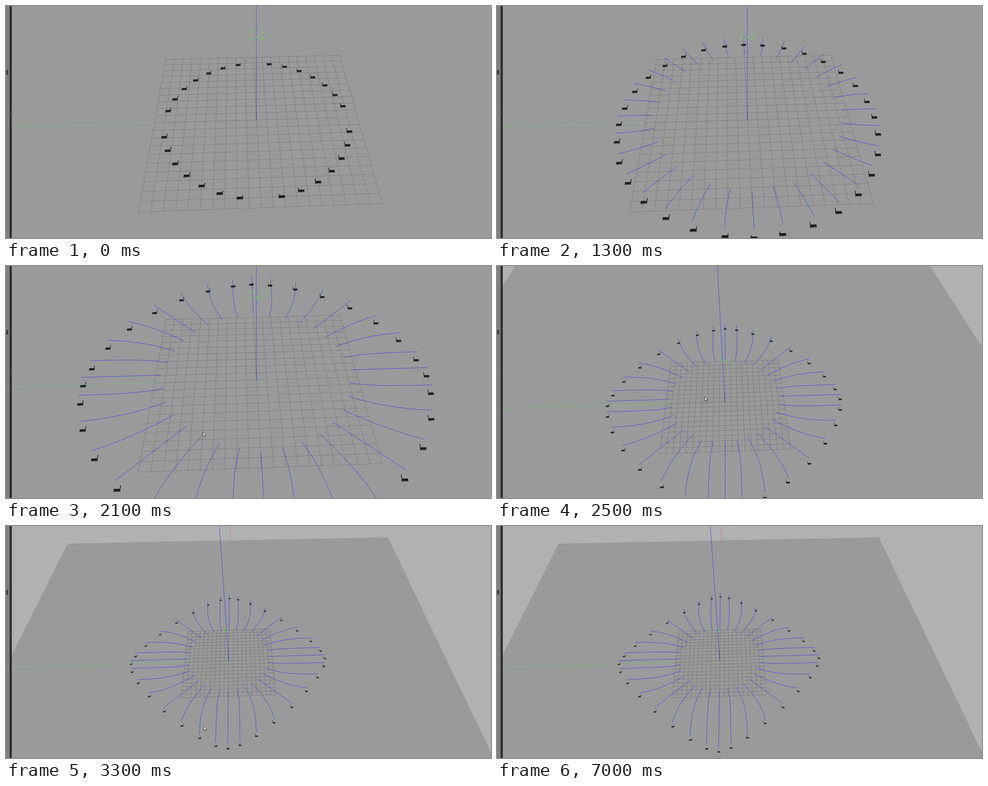
An HTML page with a canvas that plays this animation: 1081 px wide and 518 px high, repeating every 8000 ms.

```html
<!DOCTYPE html>
<html lang="en">
<head>
<meta charset="utf-8">
<title>Robot swarm spreading out</title>
<style>
html, body { margin: 0; width: 100%; height: 100%; overflow: hidden; background: #9a9a9a; }
canvas { display: block; }
</style>
</head>
<body>
<canvas id="stage" width="1081" height="518"></canvas>
<script>
const ctx = document.getElementById('stage').getContext('2d');
const LOOP = 8000, STEP = 100, ROBOTS = 32;
const RADIUS = 9, REACH = 13.2, BULGE = 9.6;   // start circle and final outline, in grid cells
const NADIR_Y = 1700, TRAIL_HEIGHT = 0.88, ROBOT_SHIFT = 0.18;

// Views: grid corners clockwise from top left, blue axis, marker box
const WIDE = [356, 119.5, 744, 110, 839, 441, 295, 460, 558, 254, 558, 0, 544.5, 57.5, 28, 16];
const MID = [388, 216, 628, 210, 654, 409, 362, 419, 508, 304, 491, 0, 496.5, 204, 14, 9];
const FAR = [406, 235, 588, 230, 601, 377, 390, 384, 496.5, 301, 475.5, 0, 485.5, 229, 10, 6.5];

// Tracks: a time followed by the values reached then
const VIEW = [[2300, ...WIDE], [2500, ...MID], [2600, ...FAR]];
const SPREAD = [[800, 0], [1300, 0.257], [2100, 0.569], [2500, 0.772], [2800, 0.88], [3300, 0.95], [3900, 1]];
const POINTER = [[2000, 434, 392], [2100, 439, 371], [2400, 463, 292], [2600, 463, 292],
  [3300, 441, 447], [3700, 425, 506], [3900, 423, 496], [4400, 423, 496], [4600, 364, 510]];
const POINTER_LATER = [[6800, 138, 362], [6900, 0, 504]];

const mix = (a, b, p) => a + (b - a) * p;

function follow(track, t) {
  const next = track.findIndex(key => key[0] > t);
  if (next === 0) return track[0].slice(1);
  if (next < 0) return track[track.length - 1].slice(1);
  const [t0, ...from] = track[next - 1], [t1, ...to] = track[next];
  return from.map((value, i) => mix(value, to[i], (t - t0) / (t1 - t0)));
}

// Ground position of a robot; the eight-fold symmetry leaves five kinds, from axis (0) to diagonal (1)
function robotAt(index, spread) {
  const j = index % 8, kind = (j > 4 ? 8 - j : j) / 4, angle = kind * Math.PI / 4;
  const settle = power => 1 - (1 - spread) ** power;
  const side = mix(RADIUS * Math.sin(angle), REACH * kind ** 1.25, settle(1.6 / kind));
  const ahead = mix(RADIUS * Math.cos(angle), REACH + BULGE * Math.cos(2 * angle), settle(1 + 0.6 * kind ** 2));
  let [x, y] = j > 4 ? [ahead, -side] : [side, -ahead];
  for (let q = Math.floor(index / 8); q > 0; q--) [x, y] = [-y, x];
  return [x, y];
}

// Perspective of the ground plane; the grid spans -10..10 both ways
function makeCamera([x0, y0, x1, y1, x2, y2, x3, y3, ax, ay, topX, topY]) {
  const dx1 = x1 - x2, dx2 = x3 - x2, sx = x0 - x1 + x2 - x3;
  const dy1 = y1 - y2, dy2 = y3 - y2, sy = y0 - y1 + y2 - y3;
  const den = dx1 * dy2 - dx2 * dy1;
  const g = (sx * dy2 - dx2 * sy) / den, h = (dx1 * sy - sx * dy1) / den;
  const size = x1 - x0;
  const nadirX = ax + (ax - topX) / (ay - topY) * (NADIR_Y - ay);
  return (wx, wy, height = 0) => {
    const u = wx / 20 + 0.5, v = wy / 20 + 0.5, w = 1 + g * u + h * v;
    const x = ((x1 - x0 + g * x1) * u + (x3 - x0 + h * x3) * v + x0) / w;
    const y = ((y1 - y0 + g * y1) * u + (y3 - y0 + h * y3) * v + y0) / w;
    const lift = height * 0.047 * size / w * (NADIR_Y - y) / 1600;
    return { x: x + lift * (x - nadirX) / (NADIR_Y - y), y: y - lift, scale: size / w };
  };
}

function stroke(points, color, width = 1) {
  ctx.beginPath();
  points.forEach(p => ctx.lineTo(p.x, p.y));
  ctx.strokeStyle = color;
  ctx.lineWidth = width;
  ctx.stroke();
}

function fill(points, color) {
  ctx.beginPath();
  points.forEach(p => ctx.lineTo(p.x, p.y));
  ctx.closePath();
  ctx.fillStyle = color;
  ctx.fill();
}

function drawGround(cam) {
  ctx.fillStyle = '#b1b1b1';
  ctx.fillRect(0, 0, 1081, 518);
  fill([cam(-50, -50), cam(50, -50), cam(50, 50), cam(-50, 50)], '#9a9a9a');
  for (let i = -10; i <= 10; i++) {
    stroke([cam(i, -10), cam(i, 10)], 'rgba(50,50,50,.36)', 0.75);
    stroke([cam(-10, i), cam(10, i)], 'rgba(50,50,50,.36)', 0.75);
  }
}

function drawAxes(cam, x, y, topX, topY) {
  stroke([cam(0, 0), cam(-10, 0)], '#679067');
  stroke([cam(-10, 0), cam(-60, 0)], '#7fba7f');
  stroke([cam(0, -50), cam(0, -120)], '#c58383');
  const bend = { x: mix(x, topX, 0.08), y: mix(y, topY, 0.08) };
  stroke([{ x, y }, bend], '#2626c4');
  stroke([bend, { x: topX, y: topY }], '#4a4ae0');
}

function drawMarker(x, y, w, h) {
  const cx = x + w / 2, cy = y + h / 2, low = y + h * 0.78;
  for (const sx of [-1, 1]) {
    for (const sy of [-1, 1]) {
      const at = (p, q) => ({ x: cx + sx * w / 2 * p, y: cy + sy * h / 2 * q });
      stroke([at(0.44, 1), at(1, 1), at(1, 0.3)], '#62dc62');
    }
  }
  stroke([{ x: cx - w * 0.12, y: low }, { x: cx + w * 0.12, y: low }], '#55e055');
  stroke([{ x: cx, y: low - h * 0.2 }, { x: cx, y: low + h * 0.2 }], '#55e055');
}

function drawTrail(cam, index, spread) {
  const count = Math.ceil(spread * 60), points = [];
  for (let i = 0; i <= count; i++) {
    points.push(cam(...robotAt(index, spread * i / count), TRAIL_HEIGHT));
  }
  stroke(points, '#3434e6', 0.8);
}

function drawRobot(cam, index, spread) {
  const [wx, wy] = robotAt(index, spread);
  const { x, y, scale } = cam(wx, wy + ROBOT_SHIFT);
  const w = scale * 0.0275, h = w * 0.42;
  const at = (p, q) => ({ x: x + p * w, y: y + q * h });
  fill([at(-0.45, -0.5), at(0.45, -0.55), at(0.5, 0.35), at(-0.5, 0.5)], '#181818');
  fill([at(-0.5, 0.15), at(0.5, 0.05), at(0.5, 0.4), at(-0.5, 0.5)], '#343434');
  // The blade stands on the inner side and leans with the sideways distance
  const inward = wx > 0.1 || (wx > -0.1 && wy > 0) ? -1 : 1;
  const lean = Math.min(1, Math.abs(wx) / 7);
  const tall = mix(0.7, 1.3 + 0.5 * spread, lean);
  stroke([at(inward * 0.42, 0), at(inward * (0.42 + 0.12 * lean), -0.2 - tall)], '#222', Math.max(0.8, w * 0.11));
}

function drawPanel() {
  const block = (color, ...rect) => { ctx.fillStyle = color; ctx.fillRect(...rect); };
  block('#808080', 0, 0, 8, 518);
  block('#303030', 8, 0, 5, 518);
  block('#424242', 0, 143, 5, 10);
  block('#5a5a5a', 10, 236, 1, 8);
}

function drawPointer(track, t) {
  if (t < track[0][0] || t > track[track.length - 1][0]) return;
  const [x, y] = follow(track, t);
  const arrow = [[0, 0], [0, 9], [2, 7.2], [3.5, 10.5], [5, 9.8], [3.6, 6.6], [6.3, 6.5], [0, 0]]
    .map(([dx, dy]) => ({ x: x + dx, y: y + dy }));
  fill(arrow, '#fff');
  stroke(arrow, '#222', 0.9);
}

function draw(t) {
  const view = follow(VIEW, t), cam = makeCamera(view);
  const [spread] = follow(SPREAD, t);
  drawGround(cam);
  drawAxes(cam, ...view.slice(8, 12));
  if (spread > 0) for (let i = 0; i < ROBOTS; i++) drawTrail(cam, i, spread);
  for (let i = 0; i < ROBOTS; i++) drawRobot(cam, i, spread);
  drawMarker(...view.slice(12));
  drawPanel();
  drawPointer(POINTER, t);
  drawPointer(POINTER_LATER, t);
}

const began = performance.now();
function tick() {
  const t = (performance.now() - began) % LOOP;
  draw(Math.floor(t / STEP) * STEP);
  requestAnimationFrame(tick);
}
tick();
</script>
</body>
</html>
```
